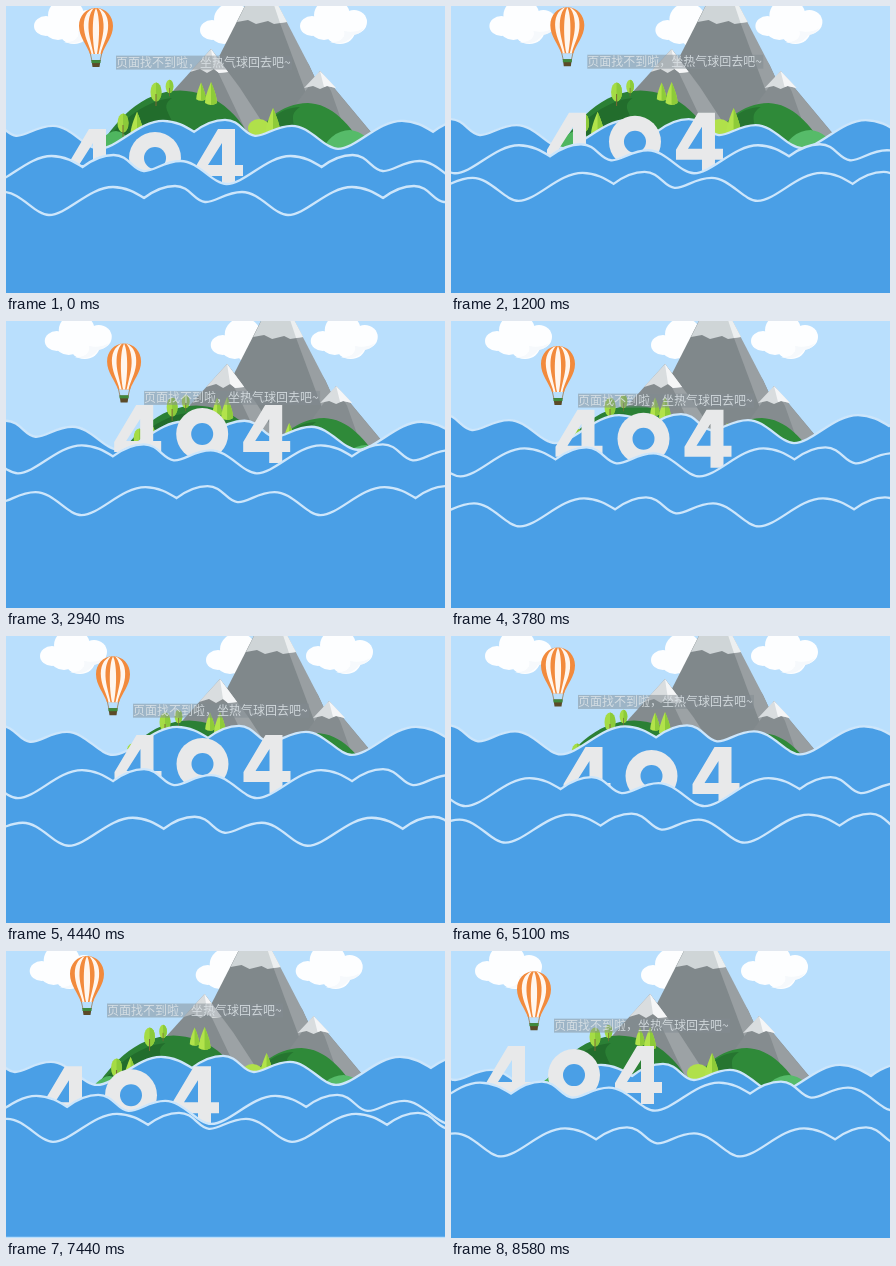
These frames come from a looping animation (439 by 287 pixels, 8640 ms). An HTML page:

```html
<!DOCTYPE html>
<html lang="zh">
<head>
<meta charset="utf-8">
<title>404</title>
<style>
html, body { margin: 0; width: 100%; height: 100%; overflow: hidden; background: #b9dffd; }
svg { display: block; width: 439px; height: 287px; }
text { font: 12px "Noto Sans CJK SC", "Noto Sans CJK", "Noto Sans", sans-serif; }
</style>
</head>
<body>
<svg viewBox="0 0 439 287">
  <defs>
    <g id="cloud" fill="#fdfeff">
      <ellipse cx="60" cy="9" rx="18" ry="16"/>
      <ellipse cx="40" cy="20" rx="12" ry="10"/>
      <ellipse cx="82" cy="16" rx="13" ry="12"/>
      <ellipse cx="52" cy="24" rx="13" ry="10"/>
      <ellipse cx="68" cy="25" rx="15" ry="13"/>
      <path d="M58 36C70 37 74 30 72 25C80 27 88 25 92 22C88 28 84 29 81 29C76 37 66 39 58 36Z" fill="#f6f9fc"/>
    </g>
    <g id="round">
      <ellipse rx="5.500" ry="9.500" fill="#a5dc45"/>
      <path d="M0-9.500A5.500 9.500 0 0 1 0 9.500Z" fill="#8ccb3a"/>
      <path d="M0 2V14" stroke="#7a6a35"/>
    </g>
    <g id="cone">
      <path d="M0-12C3-5 6 3 6 9Q0 13-6 9C-6 3-3-5 0-12Z" fill="#b2e34b"/>
      <path d="M0-12C3-5 6 3 6 9Q3 11 0 11Z" fill="#8ecb39"/>
    </g>
    <path id="four" d="M22 0H39V36H47V47H39V58H26V47H0V37ZM26 14L12 36H26Z" fill-rule="evenodd"/>
  </defs>

  <rect width="439" height="287" fill="#b9dffd"/>
  <g id="clouds">
    <use href="#cloud"/>
    <use href="#cloud" x="166" y="4"/>
    <use href="#cloud" x="266"/>
  </g>

  <g id="island">
    <path d="M250-22L195 86L215 150H345L303 59Z" fill="#80888b"/>
    <path d="M261-22L274 17L303 95L330 150H345L303 59Z" fill="#999fa2"/>
    <path d="M250-22L231 16L242 14L250 18L262 15L268 18L281 16L261-22Z" fill="#cfd5d7"/>
    <path d="M261-22L274 17L281 16Z" fill="#eceff0"/>
    <path d="M205 43L158 95L180 140H265L233 80Z" fill="#848b8e"/>
    <path d="M205 43L212 66L240 125H262L234 82Z" fill="#9ca2a5"/>
    <path d="M205 43L184 66L194 63L201 67L208 63L213 67L222 66Z" fill="#d9dddf"/>
    <path d="M205 43L208 63L213 67L222 66Z" fill="#f5f6f7"/>
    <path d="M314 65L285 105L300 150H385Z" fill="#858c8f"/>
    <path d="M314 65L325 85L348 150H385L367 129Z" fill="#989ea1"/>
    <path d="M314 65L298 82L307 80L314 83L321 80L330 82Z" fill="#d9dddf"/>
    <path d="M314 65L318 81L321 80L330 82Z" fill="#f5f6f7"/>
    <path d="M240 150C255 113 275 98 302 97C325 98 344 116 362 150Z" fill="#2f8a39"/>
    <path d="M240 150C256 114 276 101 294 101C278 112 296 118 285 150Z" fill="#267530"/>
    <path d="M88 150C108 115 135 85 174 84.500C207 86 232 102 254 150Z" fill="#2b8035"/>
    <path d="M88 150C110 118 138 94 166 92C148 105 180 112 166 150Z" fill="#226d2c"/>
    <path d="M84 150Q97 126 110 125Q124 127 132 150Z" fill="#4fb65f"/>
    <path d="M236 150Q246 127 262 127Q277 128 286 150Z" fill="#4fb65f"/>
    <path d="M312 150Q325 124 344 124Q360 125 376 150Z" fill="#56bb69"/>
    <use href="#round" x="150" y="86"/>
    <use href="#round" transform="translate(163.500 80.500)scale(.7)"/>
    <use href="#round" x="117" y="117"/>
    <use href="#cone" transform="translate(195 86)scale(.8)"/>
    <use href="#cone" x="205" y="88"/>
    <use href="#cone" transform="translate(131 119)scale(1.1)"/>
    <ellipse cx="253" cy="122" rx="11" ry="9" fill="#b0e04a"/>
    <use href="#cone" transform="translate(267 117)scale(1.25)"/>
  </g>

  <g id="balloon">
    <path d="M84 46L86 55M96 46L94 55" stroke="#9a7a55" stroke-width=".8"/>
    <path d="M90 2C100 2 107 10 107 20C107 31 99 39 96 48H84C81 39 73 31 73 20C73 10 80 2 90 2Z" fill="#f28a3c"/>
    <path d="M88 2C80 5 77 13 78 23C79 33 84 40 85.500 48H87.500C85 36 82 28 82.500 18C83 10 85 5 88 2ZM92 2C100 5 103 13 102 23C101 33 96 40 94.500 48H92.500C95 36 98 28 97.500 18C97 10 95 5 92 2ZM90 2C86 10 86 32 89 48H91C94 32 94 10 90 2Z" fill="#fff6ee"/>
    <path d="M85.500 54H94.500L93.500 61H86.500Z" fill="#5b4a28"/>
    <path d="M85.500 54H94.500V57H85.500Z" fill="#3f8a3c"/>
    <rect x="110" y="49.500" width="176" height="14" fill="#828c92" fill-opacity=".5"/>
    <text x="110" y="61" fill="#dde4e8" fill-opacity=".85">页面找不到啦，坐热气球回去吧~</text>
  </g>

  <g id="back"></g>
  <g id="digits" fill="#e8e9ea">
    <use href="#four" x="61" y="123"/>
    <circle cx="149" cy="152" r="26"/>
    <circle cx="149" cy="152" r="11" fill="#4a9fe6"/>
    <use href="#four" x="190" y="123"/>
  </g>
  <g id="mid"></g>
  <g id="front"></g>
</svg>
<script>
const LOOP = 8640, STEP = 60;
const $ = id => document.getElementById(id);

// One swell is 239px wide; x, y is the sharp notch between its two crests.
const SWELL = 'c18 0 40-28 64-28c13 0 23 6 31 11c8-6 18-12 31-12c15 0 19 15 30 16c10 1 20-10 37-10c18 0 32 23 46 23';
function buildWave(id, x, y, depth) {
  const crest = `M${x - 95 - 478} ${y + 17}` + SWELL.repeat(5);
  $(id).innerHTML = `<path d="${crest}V${y + depth}H${x - 573}Z" fill="#4a9fe6"/>
    <path d="${crest}" fill="none" stroke="#cde6fb" stroke-width="2.3"/>`;
}
buildWave('back', 188, 126, 100);
buildWave('mid', 76, 161, 90);
buildWave('front', 138, 192, 112);

// Smooth curve through the given values, flat at turning points.
const TIMES = [0, 2160, 3780, 5100, 6060, 7440, 8580];
function drift(values) {
  const slopes = values.slice(1).map((v, i) => (v - values[i]) / (TIMES[i + 1] - TIMES[i]));
  const tangents = values.map((_, i) => {
    const a = slopes[i - 1] ?? slopes[i], b = slopes[i] ?? a;
    return a * b > 0 ? 2 * a * b / (a + b) : 0;
  });
  return t => {
    let i = 0;
    while (i < TIMES.length - 2 && t > TIMES[i + 1]) i++;
    const h = TIMES[i + 1] - TIMES[i], u = Math.min(1, (t - TIMES[i]) / h), w = 1 - u;
    return w * w * (1 + 2 * u) * values[i] + u * u * (1 + 2 * w) * values[i + 1]
      + h * u * w * (w * tangents[i] - u * tangents[i + 1]);
  };
}
const bob = (t, low, amp, peak, period) =>
  low + amp * (Math.cos(2 * Math.PI * (t - peak) / period) - 1);

const sceneX = drift([0, 15, 6, 6, 0, -4.3, -4]);
const balloonX = drift([0, 38, 17, 17, 0, -9, -7]);
const backX = drift([0, 27, 11, 17, 6, -2, -7]);
const digitsX = drift([0, 50.5, 43.5, 51.5, 13, -24, -26]);
const frontX = drift([0, 35.5, 26, 11.5, -5, 4, 7]);

function move(id, x, y = 0) {
  $(id).setAttribute('transform', `translate(${x.toFixed(2)} ${y.toFixed(2)})`);
}

function render(t) {
  const dx = digitsX(t), dy = bob(t, 1, 20, 6400, 6740);
  move('clouds', sceneX(t));
  move('island', sceneX(t) * 1.5);
  move('balloon', balloonX(t), bob(t, 23.4, 13.2, 3582, 5860));
  move('back', backX(t), bob(t, 0.6, 12.7, 9300, 8800));
  move('digits', dx, dy);
  move('mid', 0.6 + dx * 0.64, dy * 0.66);
  move('front', frontX(t), bob(t, 0.8, 10.8, 4500, 4800));
}

const start = performance.now();
function tick() {
  const t = (performance.now() - start) % LOOP;
  render(Math.floor(t / STEP) * STEP);
  requestAnimationFrame(tick);
}
tick();
</script>
</body>
</html>
```
